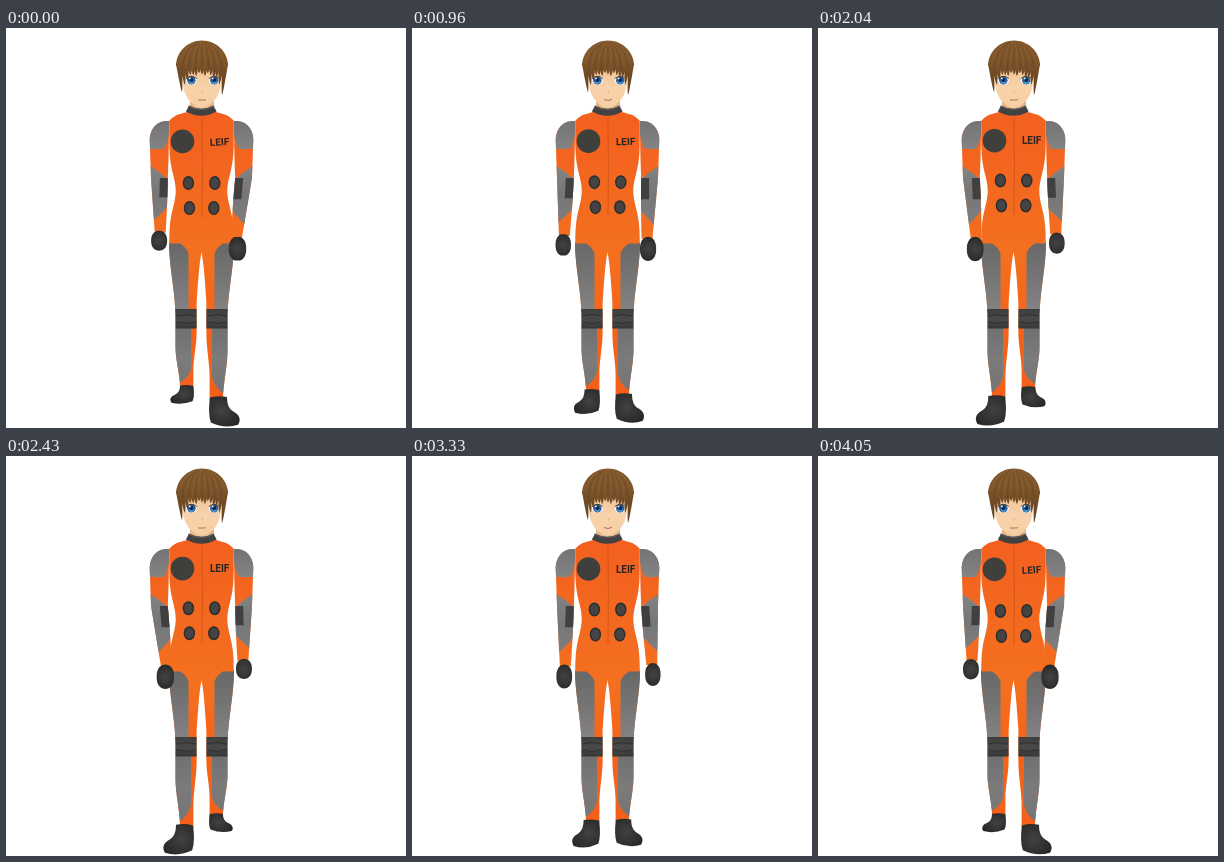
These frames come from a looping animation (400x400 px, 4150 ms). An HTML page with a canvas:

```html
<!DOCTYPE html>
<html lang="en">
<head>
<meta charset="utf-8">
<title>Walk cycle</title>
<style>
html, body { margin: 0; width: 100%; height: 100%; overflow: hidden; background: #fff; }
canvas { display: block; width: 400px; height: 400px; }
</style>
</head>
<body>
<canvas id="stage"></canvas>
<script>
const LOOP = 4150, TURN = 2560, ARM_LAG = 100;
const WIDTH = 391; // the body is mirrored about WIDTH / 2
const canvas = document.getElementById('stage');
const ctx = canvas.getContext('2d');
const dpr = window.devicePixelRatio || 1;
canvas.width = canvas.height = 400 * dpr;
ctx.scale(dpr, dpr);

const clamp = v => Math.max(0, Math.min(1, v));
const ramp = (v, a, b) => clamp((v - a) / (b - a));
const smooth = k => k * k * (3 - 2 * k);
const still = (x, y) => [x, y];
// Value through a at u = 1, n at u = 0 and b at u = -1.
const swing = (a, n, b, u) => n + (a - b) / 2 * u + ((a + b) / 2 - n) * u * u;

function stops(g, cols) {
  cols.forEach((c, i) => g.addColorStop(i / (cols.length - 1), c));
  return g;
}
const vertical = (y0, y1, ...cols) => stops(ctx.createLinearGradient(0, y0, 0, y1), cols);
const radial = (x, y, r, ...cols) => stops(ctx.createRadialGradient(x, y, 0, x, y, r), cols);

// Fills between two edges given as functions of y.
function strip(left, right, y0, y1, fill, warp = still) {
  const n = 48, at = i => y0 + (y1 - y0) * i / n;
  ctx.beginPath();
  for (let i = 0; i <= n; i++) ctx.lineTo(...warp(left(at(i)), at(i)));
  for (let i = n; i >= 0; i--) ctx.lineTo(...warp(right(at(i)), at(i)));
  ctx.fillStyle = fill;
  ctx.fill();
}

function oval(x, y, rx, ry, fill) {
  ctx.beginPath();
  ctx.ellipse(x, y, rx, ry, 0, 0, Math.PI * 2);
  ctx.fillStyle = fill;
  ctx.fill();
}

function curve(x0, y0, cx, cy, x1, y1, color, width) {
  ctx.beginPath();
  ctx.moveTo(x0, y0);
  ctx.quadraticCurveTo(cx, cy, x1, y1);
  ctx.strokeStyle = color;
  ctx.lineWidth = width;
  ctx.stroke();
}

const suit = vertical(85, 370, '#f3601f', '#f3681f', '#f4701f', '#f4621a', '#f4601a');
const pad = vertical(94, 124, '#747474', '#858585');
const sleeve = vertical(137, 197, '#848484', '#767676', '#7f7f7f');
const thigh = vertical(215, 285, '#686868', '#757575', '#848484');
const shin = vertical(300, 362, '#707070', '#7b7b7b', '#757575');
const band = vertical(280, 302, '#3c3c3c', '#494949', '#353535');

// Body edges, left half.
const flank = y => Math.max(181 - 21 * Math.sqrt(ramp(y, 84, 96)),
  163.2 + 6.5 * Math.exp(-(((y - 163) / 23) ** 2)));
const armOut = y => 143.7 + Math.max(0, y - 112) * 0.035
  + 16 * (1 - Math.sqrt(1 - ramp(y, 112, 93) ** 2));
const armIn = y => 163 - 5 * ramp(y, 93, 210) ** 2;
const legOut = y => 163 + 6.5 * smooth(ramp(y, 214, 290)) + 4.5 * smooth(ramp(y, 320, 364));
const legIn = y => 195.8 - 5.2 * ramp(y, 225, 275) ** 0.6 - 3.2 * smooth(ramp(y, 305, 345));

function onSide(right, draw) {
  ctx.save();
  if (right) { ctx.translate(WIDTH, 0); ctx.scale(-1, 1); }
  draw();
  ctx.restore();
}

function shoe(x, y, w, h) {
  ctx.save();
  ctx.translate(x, y);
  ctx.scale(w, h);
  ctx.beginPath();
  ctx.moveTo(0.42, 0.03);
  ctx.quadraticCurveTo(0.7, -0.03, 0.97, 0.05);
  ctx.quadraticCurveTo(1.04, 0.6, 0.94, 0.88);
  ctx.quadraticCurveTo(0.5, 1.1, 0.06, 0.96);
  ctx.quadraticCurveTo(-0.1, 0.68, 0.24, 0.5);
  ctx.quadraticCurveTo(0.42, 0.38, 0.42, 0.03);
  ctx.fillStyle = radial(0.6, 0.5, 0.65, '#424242', '#343434', '#282828');
  ctx.fill();
  ctx.restore();
}

function leg(u) {
  const x0 = swing(164, 160, 157, u), x1 = 188;
  const y0 = swing(357, 363, 368, u), y1 = swing(375.5, 390.5, 398, u);
  const stretch = (y0 - 300) / 61;
  const warp = (x, y) => [x, y > 300 ? 300 + (y - 300) * stretch : y];
  strip(legOut, legIn, 214, 365, suit, warp);
  strip(legOut, y => 182.5 - 9 * ramp(y, 227, 215) ** 2, 215.5, 283, thigh);
  strip(legOut, y => 185 - 10 * ramp(y, 342, 358) ** 2, 300, 358, shin, warp);
  strip(legOut, legIn, 281, 300.5, band);
  for (const d of [-3, 3]) curve(170, 291 + d, 180, 291 + 2 * d, 190, 291 + d, '#2b2b2b', 0.8);
  shoe(x0, y0, x1 - x0, y1 - y0);
}

function arm(u) {
  const x = 148.7 + (u < 0 ? 11 : 4.5) * Math.abs(u) ** 0.8;
  const y = swing(212.5, 219.7, 220.7, u);
  const w = swing(16, 15.5, 17.5, u), h = swing(20, 23.5, 24.5, u);
  const dx = x - 151.5, dy = y - h / 2 - 208;
  const warp = (px, py) => {
    const k = ramp(py, 150, 210);
    return [px + dx * k, py + dy * k];
  };
  strip(armOut, armIn, 93, 210, suit, warp);
  strip(armOut, y => armIn(y) - 5 * ramp(y, 104, 121) ** 2, 93, 121, pad);
  strip(armOut, y => armOut(y) + (armIn(y) - armOut(y))
    * Math.min(1, 1.5 * Math.sin(Math.PI * ramp(y, 138, 196))), 138, 196, sleeve, warp);
  strip(y => armIn(y) - 8, armIn, 150, 171, '#404040', warp);
  // Fist: a rounded box, narrower at the bottom.
  const half = py => w / 2 * (1 - Math.abs((py - y) / h * 2) ** 2.4) ** 0.5;
  strip(py => x - half(py), py => x + half(py), y - h / 2, y + h / 2,
    radial(x, y, 13, '#434343', '#363636', '#272727'));
}

function torso(s) {
  strip(flank, y => WIDTH - flank(y), 84, 224, suit);
  const low = 1.4 * s;
  curve(196, 89, 196.8, 140, 196, 188 + low, '#cc5216', 0.8);
  for (const row of [0, 1]) {
    for (const side of [-1, 1]) {
      const x = 195.6 + side * (13.2 - row), y = 153.6 + row * 25 + low;
      oval(x, y, 5.7, 7, '#2d2d2d');
      oval(x, y, 4.3, 5.5, '#444');
    }
  }
  oval(176.5, 113 + s * 0.4, 11.8, 11.8, '#3f3f3b');
  ctx.save();
  ctx.translate(213.6, 113.9 + s * 0.6);
  ctx.rotate(-0.06 * Math.max(0, s));
  ctx.font = 'bold 10px Roboto, "Liberation Sans", sans-serif';
  ctx.textAlign = 'center';
  ctx.textBaseline = 'middle';
  ctx.fillStyle = '#2c2421';
  ctx.fillText('LEIF', 0, 0);
  ctx.restore();
}

function eye(x) {
  oval(x, 52.3, 5.4, 4.4, '#fff');
  oval(x, 52.3, 4.2, 4.3, '#2464a6');
  oval(x, 54, 2.6, 2, '#4a94cc');
  oval(x, 51.9, 2, 2.2, '#10264a');
  oval(x - 1.5, 50.4, 0.9, 0.9, '#fff');
  curve(x - 5.4, 50.6, x, 46, x + 5.4, 50.6, '#4a3220', 0.9);
}

function hair() {
  const brown = vertical(13, 64, '#85592d', '#7f562c', '#704a25', '#654220');
  const cap = y => 26 * Math.sqrt(1 - ramp(y, 38, 12.5) ** 2);
  strip(y => 196 - cap(y), y => 196 + cap(y), 12.5, 38, brown);
  const locks = 15;
  for (let i = 0; i < locks; i++) {
    const k = i / (locks - 1) * 2 - 1;
    const x = 196 + 23 * k, tip = 45 + 19 * Math.abs(k) ** 4 + i % 3 * 1.5;
    strip(y => x - 3 * k * ramp(y, 36, tip) - 3 * ramp(y, tip, 36) ** 0.7,
      y => x - 3 * k * ramp(y, 36, tip) + 3 * ramp(y, tip, 36) ** 0.7, 36, tip, brown);
    curve(196 + 8 * k, 15 + i % 3, 196 + 22 * k, 22, x, 38 + i * 5 % 7,
      i % 2 ? 'rgba(74,46,20,.35)' : 'rgba(160,118,70,.3)', 0.8);
  }
}

function head(s) {
  strip(() => 184, () => 208, 66, 84, vertical(68, 84, '#dca878', '#edbf92'));
  curve(181.5, 80.5, 195.5, 88, 209, 80.5, '#424242', 7);
  curve(182, 78, 196, 85, 208.5, 78, '#666', 0.8);
  const jaw = y => 19 * (1 - ramp(y, 52, 80) ** 2.2) ** 0.6;
  strip(y => 195.8 - jaw(y), y => 195.8 + jaw(y), 32, 80, vertical(38, 80, '#f1c395', '#f8d2aa', '#f7cfa6'));
  eye(185.4);
  eye(208.2);
  curve(196.2, 62.5, 197.3, 64, 196, 64.3, '#d09a70', 0.8);
  const smile = 1.5 * (1 - s * s);
  curve(192, 72 - smile / 3, 196, 72.2 + smile, 200, 71.8 - smile / 3, '#94604a', 0.8);
  hair();
}

// Stride: 1 to -1 and back, the return being quicker.
function stride(time) {
  const t = (time + LOOP) % LOOP;
  return t < TURN ? Math.cos(Math.PI * t / TURN)
    : -Math.cos(Math.PI * (t - TURN) / (LOOP - TURN));
}

function draw(time) {
  const s = stride(time), a = stride(time - ARM_LAG);
  ctx.fillStyle = '#fff';
  ctx.fillRect(0, 0, 400, 400);
  torso(s);
  onSide(false, () => leg(s));
  onSide(true, () => leg(-s));
  onSide(false, () => arm(a));
  onSide(true, () => arm(-a));
  head(s);
}

let start;
function tick(now) {
  if (start === undefined) start = now;
  draw(now - start);
  requestAnimationFrame(tick);
}
draw(0);
requestAnimationFrame(tick);
</script>
</body>
</html>
```
